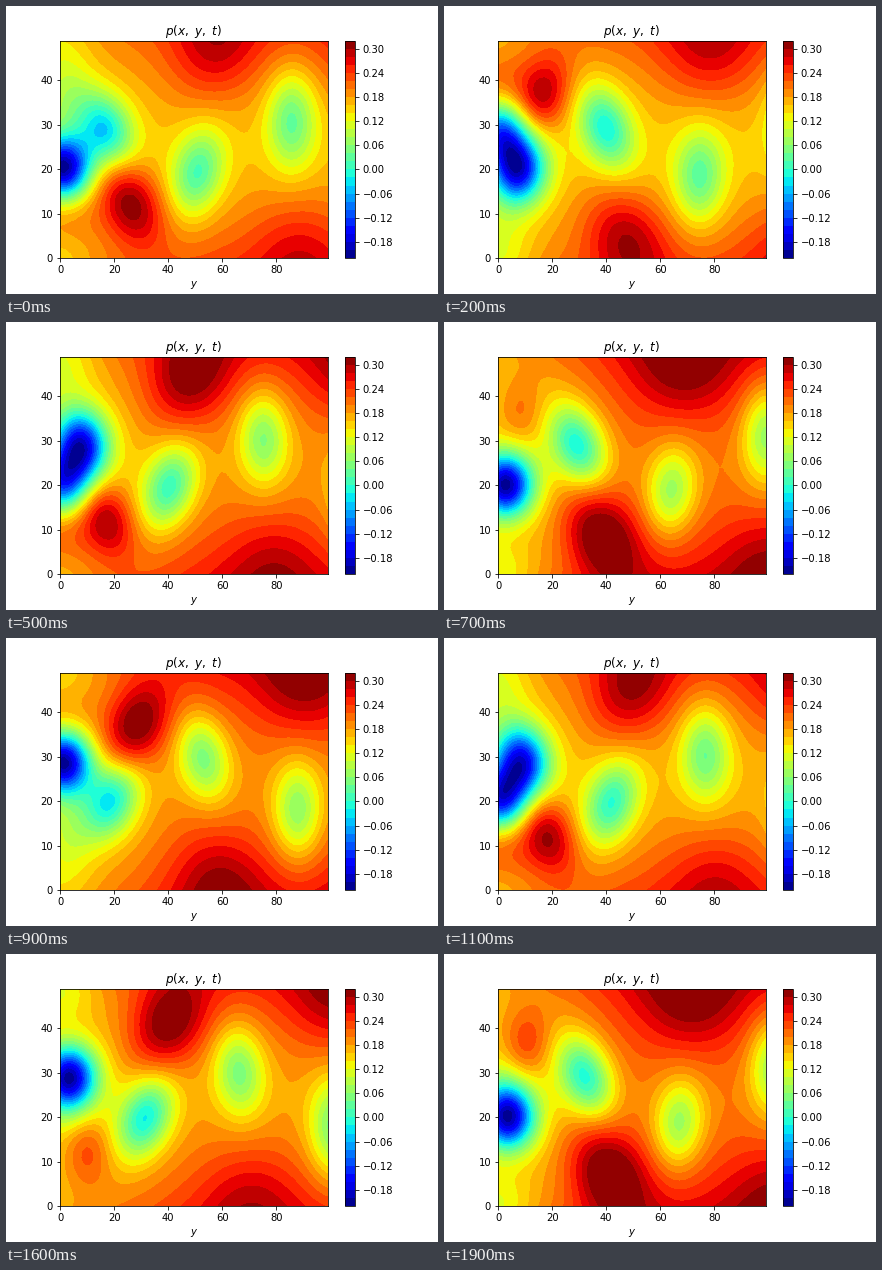
Animation of 432 by 288 pixels, one loop 2 s. Source, as a matplotlib script:

```python
import numpy as np
import matplotlib.pyplot as plt
from matplotlib.animation import FuncAnimation

FRAMES, STEP = 20, 100
PERIOD = 5.88              # shedding period in frames
W, H = 99, 49
LEVELS = np.arange(-11, 17) * 0.02

plt.rcParams.update({"font.family": "DejaVu Sans", "font.size": 10})

gx, gy = np.meshgrid(np.arange(W + 1.0), np.arange(H + 1.0))


def ease(u):
    u = np.clip(u, 0, 1)
    return u * u * (3 - 2 * u)


def drift(s):
    """Stays near the inlet while s < 0, then follows s downstream."""
    return (s + np.hypot(s, 10)) / 2


# Features of the lower half at phase p: x, y, pressure, widths, tilt.
def well(p):
    x = drift(28 + 70 * p)
    y = 20 - 2.5 * np.clip(p, 0, 1)
    v = (-0.215 + 0.3 * ease((-0.75 - p) / 0.25)
         + 0.18 * ease((p + 0.35) / 0.2) + 0.06 * ease(p / 0.5))
    tilt = 0.35 * ease((p + 0.4) / 0.3) * (1 - ease(p / 0.8))
    return x, y, v, 7 - 0.7 * np.clip(p, -1, 1), 6.2 + 1.8 * np.clip(p, -0.5, 1), tilt


def peak(p):
    x = drift(5 + 63 * p)
    y = 2 + 10.5 * (1 - ease((p - 0.3) / 0.55))
    v = (0.04 + 0.13 * ease((-0.5 - p) / 0.5)
         + 0.27 * ease((p + 0.3) / 0.55) - 0.04 * ease((p - 0.5) / 0.5))
    age = min(abs(p), 1)
    tilt = -0.35 * ease(p / 0.2) * (1 - ease((p - 0.5) / 0.5))
    return x, y, v, 5.5 + 7.5 * age, 5.5 + 3.5 * age, tilt


def corner(p):
    return 0, 0, 0.145 + 0.03 * np.cos(2 * np.pi * (p - 0.1)), 9, 6, 0


def features(t):
    rows = []
    for upper in (0, 1):
        phase = (t - 4) / PERIOD + 0.5 * upper
        group = [corner(phase)]
        for p in phase % 1 + np.arange(-1, 2):
            group.append(peak(p))
            if p < 1.4:
                group.append(well(p))
        for x, y, v, sx, sy, tilt in group:
            if upper:
                y, tilt = H - y, -tilt
                v += 0.02 * ease((x - 50) / 20) * (v > 0.2)
            rows.append((x, y, v, sx, sy, tilt))
    return np.array(rows, dtype=float)


def background(x, y):
    edge = 0.03 + 0.035 * np.clip(x / 60, 0, 1)
    return 0.155 + edge * ((y - H / 2) / (H / 2)) ** 2


def kernel(x, y, f):
    cx, cy, _, sx, sy, tilt = f
    dy = y - cy
    dx = x - cx - tilt * dy
    return np.exp(-0.5 * ((dx / sx) ** 2 + (dy / sy) ** 2))


def pressure(t):
    feats = features(t)
    x, y, v = feats[:, :3].T
    # Weights chosen so the field meets each feature's pressure at its centre.
    basis = np.stack([kernel(x, y, f) for f in feats], axis=1)
    weights = np.linalg.solve(basis, v - background(x, y))
    field = background(gx, gy)
    for w, f in zip(weights, feats):
        field = field + w * kernel(gx, gy, f)
    # Slow rise and fall of the downstream pressure.
    swell = 0.048 * np.cos(np.pi * (t - 7.3) / 11.6) ** 2
    field += swell * ease((gx - 10) / 45)
    return np.clip(field, LEVELS[0] + 0.001, LEVELS[-1] - 0.001)


fig, ax = plt.subplots(figsize=(6, 4), dpi=72, facecolor="white")
fig.subplots_adjust(left=0.125, right=0.9, bottom=0.125, top=0.88)


def contours(t):
    return ax.contourf(gx, gy, pressure(t), levels=LEVELS, cmap="jet",
                       vmin=LEVELS[0], vmax=LEVELS[-1])


filled = contours(0)
fig.colorbar(filled, ax=ax, ticks=np.arange(-3, 6) * 0.06)
ax.set_title(r"$p(x,\ y,\ t)$")
ax.set_xlabel("$y$")
ax.set_xlim(0, W)
ax.set_ylim(0, H)


def draw(i):
    global filled
    filled.remove()
    filled = contours(i)
    return [filled]


anim = FuncAnimation(fig, draw, frames=FRAMES, interval=STEP, repeat=True,
                     repeat_delay=0, init_func=lambda: [])
plt.show()
```
